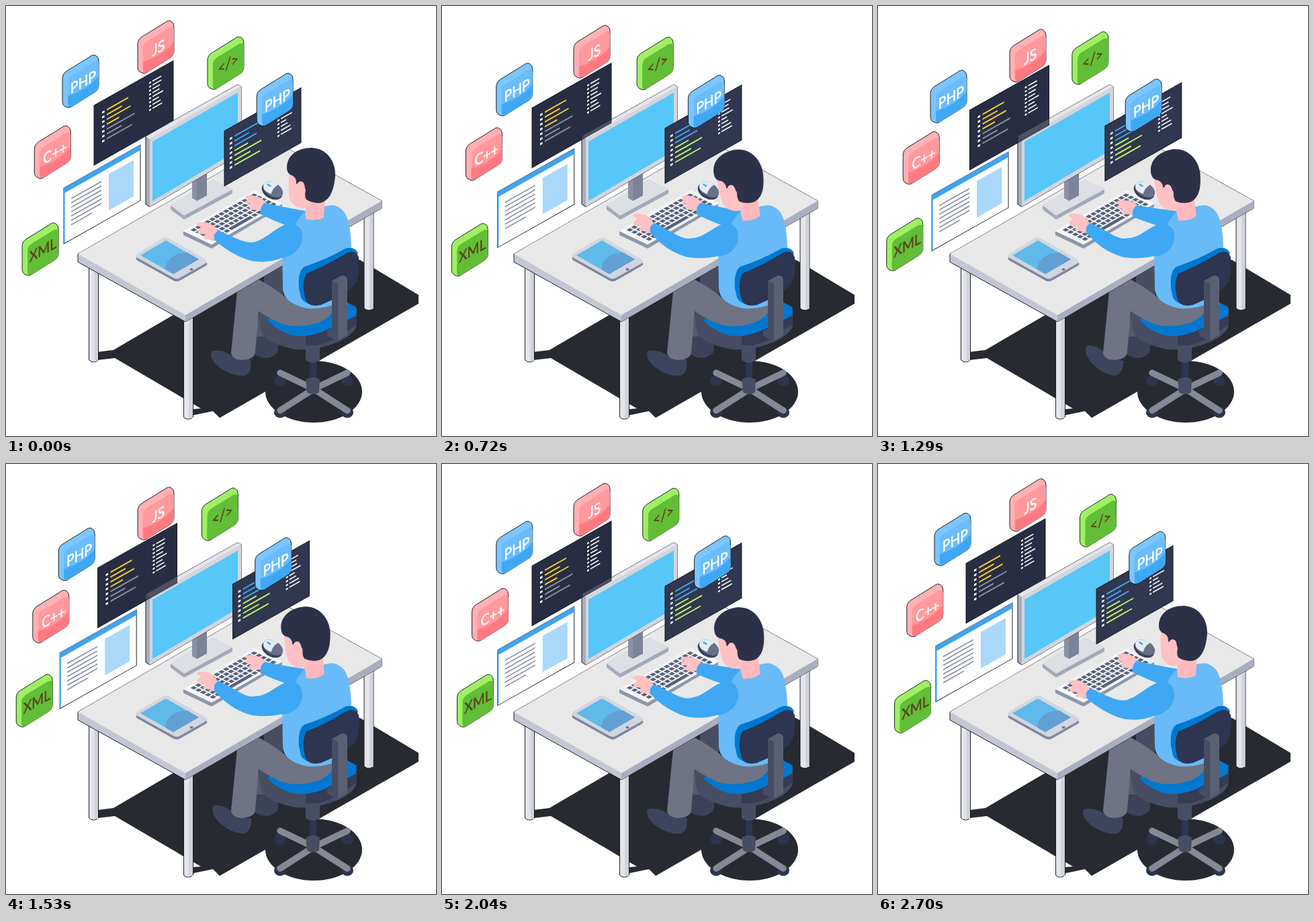
An HTML page that plays this animation: 640 by 640 pixels, repeating every 2760 ms.

```html
<!DOCTYPE html>
<html lang="en">
<head>
<meta charset="utf-8">
<title>Developer at a desk</title>
<style>
html, body { margin: 0; width: 100%; height: 100%; overflow: hidden; background: #fff; }
svg { display: block; width: 100vw; height: 100vh; }
.edge { stroke: #0c0e12; stroke-width: .9; }
text { font: 22px Lato, "Open Sans", sans-serif; text-anchor: middle; }
</style>
</head>
<body>
<svg id="stage" viewBox="0 0 640 640"></svg>
<script>
const LOOP = 2760, STEP = 30, END = LOOP - 2 * STEP;
const edge = 'class="edge"';
const path = (d, fill, extra = '') => `<path d="${d}" fill="${fill}" ${extra}/>`;
const poly = (pts, fill, extra = '') => `<polygon points="${pts}" fill="${fill}" ${extra}/>`;
const rect = (x, y, w, h, fill, extra = '') =>
  `<rect x="${x}" y="${y}" width="${w}" height="${h}" fill="${fill}" ${extra}/>`;
const oval = (x, y, rx, ry, fill) => `<ellipse cx="${x}" cy="${y}" rx="${rx}" ry="${ry}" fill="${fill}"/>`;
const group = (id, body) => `<g id="${id}">${body}</g>`;
const range = (n, f) => Array.from({ length: n }, (_, i) => f(i)).join('');

let seed = 11;
const random = () => (seed = seed * 16807 % 2147483647) / 2147483647;

function leg(x, top, bottom) {
  return path(`M${x},${top}V${bottom - 3}Q${x + 7},${bottom + 3} ${x + 14},${bottom - 3}V${top}Z`, '#e3e5ea', edge) +
    rect(x + 8, top, 5.5, bottom - top - 2, '#cfd2db');
}

function floor() {
  return poly('136,515 160,512 264,451 400,380 527,378 614,430 614,443 318,613 308,603 279,609 279,600 290,599 162,524 136,527', '#282a31') +
    oval(458, 574, 72, 46, '#282a31') + leg(123.5, 380, 530) + leg(264.5, 460, 615) + leg(533, 300, 453);
}

function tabletop() {
  return poly('107,369 399,201 559,290 559,301 267,470 107,381', '#c3c6d3', edge) +
    poly('267,460 559,290 559,301 267,470', '#a9aec0') +
    poly('107,369 399,201 559,290 267,460', '#e8e8e9');
}

const bezel = poly('208,194 345,117 350,120 350,219 214,299 208,295', '#a9adba', edge) +
  poly('214,198 350,120 350,219 214,299', '#d3d5dd') +
  poly('208,194 345,117 350,120 214,198', '#e5e6eb');
const screen = poly('218,202 345,129 345,215 218,290', '#57c6f8');

function monitor() {
  return poly('245,297 308,259 337,273 337,279 265,318 245,303', '#a4a9b8') +
    poly('245,297 308,259 337,273 265,312', '#dcdfe4') +
    poly('277,255 299,243 299,282 284,290 277,286', '#8b91a5') +
    poly('284,255 299,243 299,282 284,290', '#7c8398') + bezel + screen;
}

function keyboard() {
  const at = (u, v) => `${(264 + 106 * u + 42 * v).toFixed(1)},${(335 - 61 * u + 20 * v).toFixed(1)}`;
  const quad = (u, v, w, h, fill) => poly([at(u, v), at(u + w, v), at(u + w, v + h), at(u, v + h)].join(' '), fill);
  const key = (u, v, w) => quad(u, v, w, .12, '#59627a');
  const row = r => range(14, c =>
    r === 4 && c > 3 && c < 9 ? '' : key(.06 + c * .065, .1 + r * .17, .047));
  return poly('264,335 306,355 411,294 411,299 306,361 264,341', '#8f96aa') +
    quad(0, 0, 1, 1, '#f5f6f9') + range(5, row) + key(.32, .78, .307);
}

function tablet() {
  const frame = 'M196,368L233,346Q238,343 243,346L297,377Q302,380 297,383L260,404Q254,408 248,404L196,375Q191,372 196,368Z';
  return `<g transform="translate(0 4)">${path(frame, '#7f879d')}</g>` + path(frame, '#d2d6df') +
    poly('200,371 238,349 287,377 249,399', '#5fb9ea') +
    path('M237,392Q240,368 270,367L287,377L249,399Z', '#629fd3') + oval(276, 392, 2.6, 1.8, '#6d748b');
}

function mouse() {
  return '<g transform="rotate(30 397 274)">' + oval(397, 276, 16.5, 11, '#3b435c') + oval(397, 273, 16, 10, '#68708a') +
    path('M381,273A16,10 0 0 1 400,263Q395,272 398,280Q383,283 381,273Z', '#e4ebf2') +
    rect(385, 269, 7, 3, '#49b9dc', 'rx="1.5"') + '</g>';
}

// Sheared panels: local x runs along the slanted top edge.
function panel(id, x, y, w, h, fill, body) {
  return group(id, `<g transform="matrix(1 -.565 0 1 ${x} ${y})">${rect(0, 0, w, h, fill, edge)}${body}</g>`);
}
function code(first, second, split, left, top, right) {
  return range(7, i => rect(left, top + i * 7.2, 3.6, 3, '#fff') +
      rect(left + 7, top + i * 7.2, i % 2 ? 18 + 10 * random() : 32 + 11 * random(), 2.2, i < split ? first : second)) +
    range(8, i => rect(right, top - 4 + i * 5.8, 3, 2.4, '#fff') +
      rect(right + 5, top - 4 + i * 5.8, 8 + 11 * random(), 1.8, '#fff'));
}
function page() {
  return rect(0, 0, 114, 8, '#3fa4f2') + rect(0, 0, 1.6, 83, '#3fa4f2') + rect(67, 17, 37, 54, '#a9d8fb') +
    range(7, i => rect(11, 21 + i * 6.5, i === 6 ? 31 : 45, 1.8, '#878da2'));
}

const skins = {
  blue: { side: '#7cc5ff', face: '#6bbcfb', shade: '#3fa8f5', ink: '#fff' },
  pink: { side: '#ffb0b4', face: '#ff999e', shade: '#ff7a80', ink: '#fff' },
  green: { side: '#9df062', face: '#62bd37', shade: '#62bd37', ink: '#5a461c' }
};
function tile(id, label, skin) {
  const { side, face, shade, ink } = skins[skin];
  return group(id,
    path('M0,36Q0,29 6,25L40,4Q46,-1 50,2Q54,4 54,10V46Q54,53 47,57L15,77Q10,81 5,78Q0,76 0,70Z', side, edge) +
    path('M8,42Q8,35 15,31L46,12Q54,8 54,15V46Q54,53 47,57L15,77Q8,81 8,73Z', face) +
    path('M8,62Q36,54 54,32V46Q54,53 47,57L15,77Q8,81 8,73Z', shade) +
    `<text transform="matrix(.88 -.48 0 1 30.8 48.8)" fill="${ink}" stroke="${ink}" stroke-width=".5">${label}</text>`);
}

const SKIN = '#ffc1c3', SLEEVE = '#3ea8f5', DARK = '#2d3550', SLATE = '#474d63', BLUE = '#0078d0';

// Legs and seat, partly hidden by the tabletop.
function lowerBody() {
  return poly('384,385 412,370 412,430 384,418', SLATE) +
    path('M373,450H392L401,492Q408,505 403,517Q390,529 373,520L364,515Z', '#3c4257') +
    path('M378,455L396,465V492H370Z', '#555a6c') +
    group('shoe', path('M306,514Q318,510 334,519Q342,528 364,526Q367,544 356,550Q338,552 319,539Q302,526 306,514Z', '#3d455e')) +
    path('M377,455Q377,480 381,488Q392,503 430,511Q458,514 492,501Q518,490 522,475V456L450,430Z', SLATE) +
    path('M446,508Q475,504 492,494L522,474V462L470,476L446,485Z', '#353c53') +
    path('M389,467Q400,481 426,490Q452,495 482,480L517,463Q524,457 521,448L500,437L430,440Z', BLUE) +
    path('M346,405H372Q392,415 413,431Q430,449 461,446L490,441Q489,461 466,471Q435,481 410,473Q390,464 376,454L371,515Q370,526 352,527Q336,526 335,516Z', '#6f7383');
}

function hands() {
  return group('farHand', path('M389,295Q382,285 371,283Q359,279 356,285L362,288Q354,290 357,293L365,295Q359,299 363,302Q372,305 384,304Z', SKIN)) +
    group('nearHand', path('M317,337Q309,324 298,322Q284,321 283,326L291,330Q283,334 286,339L297,340Q292,347 297,347Q306,347 311,350Z', SKIN));
}

const farSleeve = d => `M385,${293 + d}Q415,${300 + d / 2} 452,306L432,330Q418,329 379,${310 + d}Q377,${299 + d} 385,${293 + d}Z`;
const nearSleeve = d => `M316,${334 - 2 * d}C340,${344 - 2 * d} 357,${355 - d} 371,${351 - d}C386,346 398,334 410,328` +
  `C427,319 442,326 441,345C440,360 427,373 411,${375 - d / 2}C395,${381 - d} 380,${382 - d} 364,${379 - d}` +
  `C343,${373 - d} 325,${361 - d} 310,${348 - 2 * d}Q308,${338 - 2 * d} 316,${334 - 2 * d}Z`;

function upperBody() {
  return path('', SLEEVE, 'id="farArm"') +
    path('M425,340Q435,307 452,303L480,297Q492,294 503,306Q514,322 514,365L505,435Q482,452 448,450Q412,442 412,420L411,360Z', '#69baf8') +
    group('head',
      path('M446,272L475,285L473,315Q461,321 446,317L445,298Z', '#ffb9bd') +
      path('M422,246Q419,270 422,286Q427,300 442,301Q452,299 455,285V246Z', SKIN) +
      path('M418,241C418,222 434,211 455,211C478,212 491,232 490,253C488,276 481,290 468,293Q456,294 447,288Q444,284 446,274L442,262L432,265Q433,254 423,251Q418,248 418,241Z', '#2c3147') +
      oval(438.5, 269, 6, 8, SKIN)) +
    path('', SLEEVE, 'id="nearArm"');
}

function chair() {
  const foot = (sx, y, wheelY) => oval(458 + sx * 50, wheelY, 9, 8, '#2d344c') +
    `<path d="M${458 + sx * 50},${y}L458,570" stroke="#858996" stroke-width="9.5" stroke-linecap="round"/>`;
  return path('M436,420Q434,395 444,388Q475,378 505,361Q519,357 524,368L470,445Q446,447 439,434Z', BLUE) +
    path('M447,398Q475,387 503,370Q520,360 525,374Q528,400 519,415Q505,430 473,443Q452,451 446,437Q439,414 447,398Z', DARK) +
    poly('478,483 486,480 494,490 494,499 478,491', SLATE) +
    path('M485,409L500,401Q508,401 508,408V490L494,498L485,493Z', '#5a6073') +
    poly('485,409 494,413 494,498 485,493', SLATE) +
    path('M446,505H467V527Q457,535 446,527Z', SLATE) + rect(452, 531, 10, 32, DARK) +
    [-1, 1].map(sx => foot(sx, 546, 558) + foot(sx, 602, 605)).join('') +
    path('M446,556Q457,549 467,556L466,575Q457,581 448,575Z', SLATE);
}

document.getElementById('stage').innerHTML =
  floor() + lowerBody() + tabletop() + monitor() + keyboard() + tablet() + mouse() +
  panel('codeA', 131, 148, 118, 89, '#282d43', code('#f8d12f', '#8d92a2', 4, 12, 16, 82)) +
  `<g opacity=".2">${bezel}</g>` + screen +
  panel('page', 86, 271, 114, 83, '#fff', page()) +
  panel('codeB', 325, 186, 114, 82, '#30374f', code('#43a6f5', '#bdf66f', 3, 8, 15, 79)) +
  tile('js', 'JS', 'pink') + tile('phpA', 'PHP', 'blue') + tile('cpp', 'C++', 'pink') +
  tile('xml', 'XML', 'green') + tile('tag', '&lt;/&gt;', 'green') + tile('phpB', 'PHP', 'blue') +
  hands() + upperBody() + chair();

const nodes = {};
document.querySelectorAll('[id]').forEach(n => nodes[n.id] = n);
const place = (id, x, y, angle = 0, px = 0, py = 0) => nodes[id].setAttribute('transform',
  `translate(${x.toFixed(2)} ${y.toFixed(2)}) rotate(${angle.toFixed(2)} ${px} ${py})`);

const part = (t, a, b) => Math.min(1, Math.max(0, (t - a) / (b - a)));
const hump = (t, a, b) => Math.sin(Math.PI * part(t, a, b));
const smooth = (t, a, b) => (1 - Math.cos(Math.PI * part(t, a, b))) / 2;

const SECOND = 720, THIRD = 1740; // starts of the later key strokes

function draw(t) {
  const phase = 2 * Math.PI * t / LOOP;
  const sway = (1 - Math.cos(phase)) / 2;
  const orbit = (id, x, y, r, deg, dir) => {
    const a = deg * Math.PI / 180 + dir * phase;
    place(id, x + r * Math.cos(a), y + r * Math.sin(a));
  };
  place('js', 196, 21 + 13 * sway);
  place('phpA', 84 - 6 * sway, 72 + 23 * sway);
  place('codeA', 5.6 * sway, 7 * sway);
  place('page', -6 * sway, 10.6 * sway);
  place('codeB', 13 * sway, -7.6 * sway);
  orbit('cpp', 40.2, 182, 5, -66, -1);
  orbit('phpB', 371.1, 103.8, 5, -66, -1);
  orbit('xml', 18.8, 317.8, 6.7, 38, 1);
  orbit('tag', 294.8, 40.6, 6.7, 40, 1);

  const nod = Math.sqrt(Math.abs(hump(t, 0, THIRD) + hump(t, THIRD, END)));
  const tap = (hump(t, 0, SECOND) + hump(t, SECOND, THIRD) + hump(t, THIRD, END)) ** 2;
  const lift = smooth(t, 0, 390) - smooth(t, THIRD, 2370);
  place('head', 0, 0, -12 * nod, 460, 310);
  place('farHand', 0, 4 * tap, -9 * tap, 386, 299);
  nodes.farArm.setAttribute('d', farSleeve(4 * tap));
  place('nearHand', -1 * lift, -11 * lift, 5 * lift, 315, 342);
  nodes.nearArm.setAttribute('d', nearSleeve(5.5 * lift));
  place('shoe', 0, 0, 11 * hump(t, SECOND, THIRD), 354, 536);
}

const start = performance.now();
function tick() {
  const t = (performance.now() - start) % LOOP;
  draw(Math.min(END, Math.floor(t / STEP) * STEP));
  requestAnimationFrame(tick);
}
tick();
</script>
</body>
</html>
```
